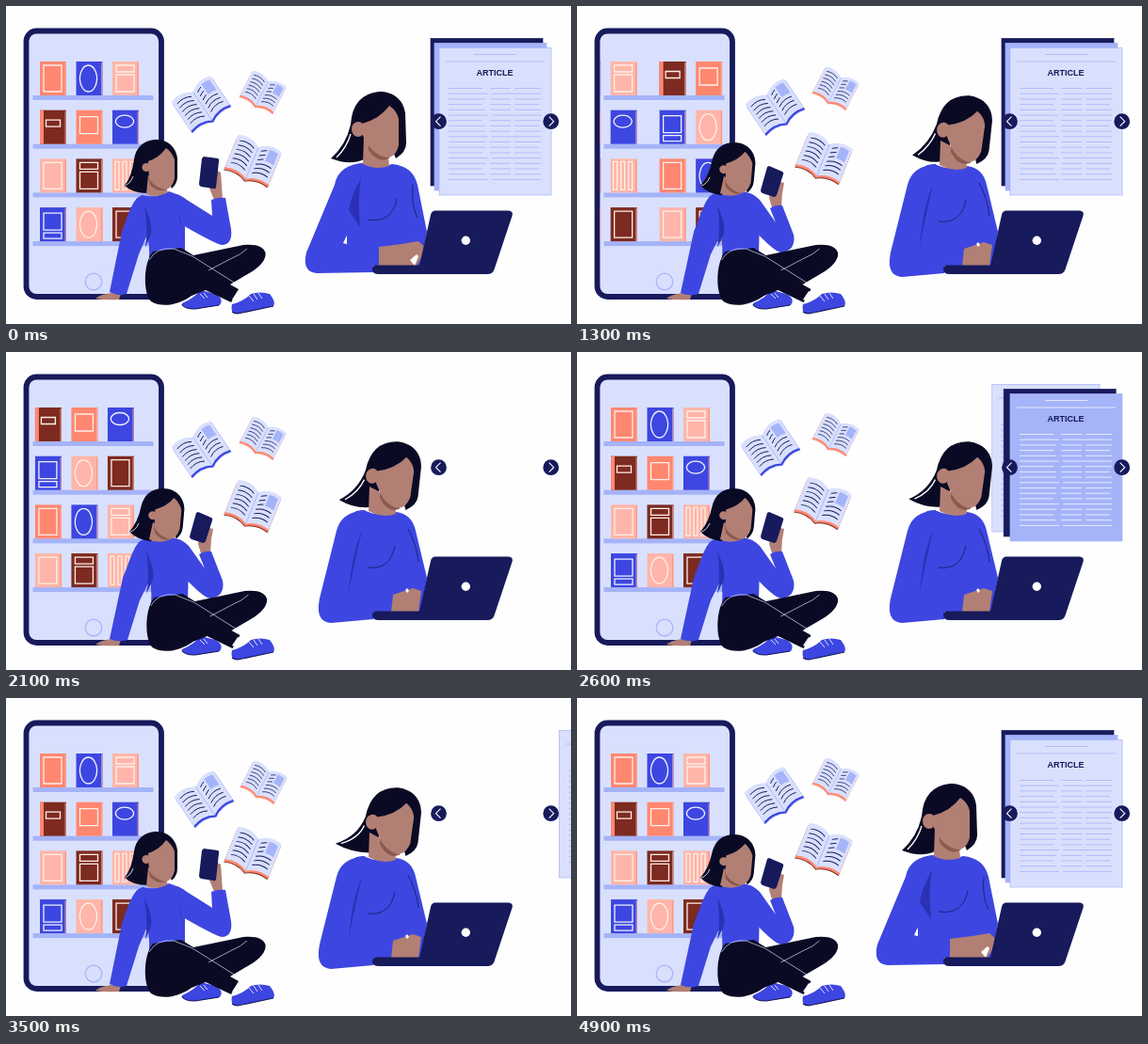
An HTML page that plays this animation: 600x338 px, repeating every 5000 ms.

```html
<!DOCTYPE html>
<html lang="en">
<head>
<meta charset="utf-8">
<title>Reading online</title>
<style>
  html, body { margin: 0; width: 100%; height: 100%; overflow: hidden; background: #fefefe; }
  svg { display: block; width: 100vw; height: 100vh; }
  text { font: bold 9px "Liberation Sans", Arial, sans-serif; text-anchor: middle; fill: #171a5b; }
</style>
</head>
<body>
<svg id="stage" viewBox="0 0 600 338">
  <defs>
    <clipPath id="screen"><rect x="24.5" y="29" width="132.5" height="277"/></clipPath>
  </defs>

  <!-- phone -->
  <rect x="21.5" y="26.500" width="143.500" height="282.500" rx="11" fill="#d9e0fd" stroke="#171a5b" stroke-width="5.800"/>
  <g id="shelves" clip-path="url(#screen)"></g>
  <circle cx="93" cy="293" r="8.800" fill="none" stroke="#a5b3f8" stroke-width="1.200"/>

  <g id="pages"></g>
  <g id="flyers"></g>

  <!-- reader on the floor -->
  <g id="girl">
    <path d="M95,311 Q99,307 111,305 L122,306 L120,312 Q106,313 95,311Z" fill="#b27f74"/>
    <path id="gArm" fill="#3d46e0"/>
    <path id="gBody" fill="#3d46e0"/>
    <path id="gShade" fill="#2a31b4"/>
    <path id="gCrease" fill="none" stroke="#171a5b" stroke-width=".8"/>
    <path id="gHand" fill="#b27f74"/>
    <path id="gPhone" fill="#171a5b"/>
    <path id="gSleeve" fill="#3d46e0"/>
    <g id="gHead">
      <path d="M158,142 C171,141 181,150 182,162 L182,181 Q182,189 176,194 L170,180 L152,180 L150,199 Q135,199 126,191 Q134,180 136,163 Q139,144 158,142Z" fill="#0a0a24"/>
    </g>
    <path id="gNeck" fill="#b27f74"/>
    <g id="gFace">
      <path d="M151,182 L168,190 L172,194 Q163,200 153,190Z" fill="#8b594e"/>
      <circle cx="149" cy="171.500" r="4.500" fill="#b27f74"/>
      <path d="M151,165 Q163,161 170,151 Q176,155 179,163 V183 Q177,194 169,195 Q158,193 152,184Z" fill="#b27f74"/>
      <path d="M135,181 Q133,188 127,191" fill="none" stroke="#fefefe" stroke-width=".8"/>
    </g>
    <path d="M187,316 Q187,322 201,322 L227,318 Q232,311 222,306 L207,302 Q199,311 187,316Z" fill="#3d46e0"/>
    <path d="M187,317 Q188,322 201,322 L226,318" fill="none" stroke="#171a5b" stroke-width="1.200"/>
    <path d="M206,306 l5,5 M210,305 l4,5" stroke="#d9e0fd"/>
    <g id="gLegs">
      <path d="M156,261 C146,272 145,305 154,314 C166,321 183,318 197,308 L212,302 L239,315 L247,301 L238,296 L260,283 Q277,272 275.500,262 Q272,252 252,254 L199,265 L186,257Z" fill="#0a0a24"/>
      <path d="M152,270 Q160,256 178,258 L198,266 L244,295 M256,258 Q250,264 238,269 L215,281" fill="none" stroke="#d9e0fd" stroke-width=".7"/>
    </g>
    <path d="M240,312 L246,303 L253,308 L248,315Z" fill="#fefefe"/>
    <path d="M240,317 Q252,314 260,306 Q270,303 280,306 Q287,315 284,319 L245,327 Q238,327 240,317Z" fill="#3d46e0"/>
    <path d="M240,325 Q244,328 251,326 L284,319" fill="none" stroke="#171a5b" stroke-width="1.200"/>
    <path d="M258,308 l5,6 M263,306 l4,6 M268,305 l4,6" stroke="#d9e0fd"/>
  </g>

  <!-- reader at the laptop -->
  <g id="woman">
    <path id="wBody" fill="#3d46e0"/>
    <path id="wArm" fill="#3d46e0"/>
    <path id="wShade" fill="#2a31b4"/>
    <path id="wCrease" fill="none" stroke="#171a5b" stroke-width=".8"/>
    <path id="wHand" fill="#b27f74"/>
    <path id="wGap" fill="#fefefe"/>
    <g id="wHead">
      <path id="wHair" fill="#0a0a24"/>
      <path id="wStrand" fill="none" stroke="#fefefe" stroke-width="1.300"/>
    </g>
    <path id="wNeck" fill="#b27f74"/>
    <g id="wFace">
      <path d="M385,145 L405,156 L408,161 Q396,169 385,153Z" fill="#8b594e"/>
      <ellipse cx="374" cy="131" rx="7" ry="8" fill="#b27f74"/>
      <path d="M378,125 Q397,120 407,106 Q415,111 417,120 V148 Q414,161 404,161 Q391,158 385,148 L379,138Z" fill="#b27f74"/>
    </g>
    <path d="M393,275.500 H512 V285 H396 Q389,285 389,280 Q389,275.500 393,275.500Z" fill="#171a5b"/>
    <path d="M456,217.500 H533 Q539,217.500 537.500,223 L518.500,280 Q517,285 511,285 H437 L451,222 Q452,217.500 456,217.500Z" fill="#171a5b"/>
    <circle cx="488.300" cy="249.300" r="4.700" fill="#fefefe"/>
  </g>
  <g id="arrows"></g>
</svg>

<script>
const LOOP = 5000, STEP = 100;
const navy = '#171a5b', blue = '#3d46e0', sky = '#a5b3f8', pale = '#d9e0fd',
      orange = '#ff8770', pink = '#ffb5a9', brown = '#7d2a20';

const $ = id => document.getElementById(id);
const clamp = p => Math.max(0, Math.min(1, p));
const span = (t, from, to) => clamp((t - from) / (to - from));
const smooth = p => p * p * (3 - 2 * p);
const inOut = p => p < .5 ? 4 * p ** 3 : 1 - (2 - 2 * p) ** 3 / 2;

function add(parent, tag, attrs) {
  const el = document.createElementNS('http://www.w3.org/2000/svg', tag);
  for (const k in attrs) el.setAttribute(k, attrs[k]);
  return parent.appendChild(el);
}

// Blend two paths that share the same commands.
function blend(a, b, k) {
  const num = /-?\d+(\.\d+)?/g, to = b.match(num);
  let i = 0;
  return a.replace(num, v => (+v + (to[i++] - v) * k).toFixed(2));
}

// ---- shelves ----
const covers = {
  frame: 'M4,4H23V32H4Z',
  tall: 'M13,4a9,14 0 1 0 .01,0Z',
  wide: 'M13,5.500a9.500,6.500 0 1 0 .01,0Z',
  title: 'M4,4H23V11H4Z M4,14H23V32H4Z',
  label: 'M6.500,10.500H21.500V17.500H6.500Z',
  square: 'M4,7H23V25H4Z',
  bars: 'M3,3H7V33H3Z M11,3H15V33H11Z M19,3H23V33H19Z',
  boxes: 'M4,6H23V24H4Z M4,27H23V33H4Z'
};
const groups = [
  [[orange, 'frame'], [blue, 'tall'], [pink, 'title']],
  [[brown, 'label'], [orange, 'square'], [blue, 'wide']],
  [[pink, 'frame'], [brown, 'title'], [pink, 'bars']],
  [[blue, 'boxes'], [pink, 'tall'], [brown, 'frame']]
];
const follow = [1, 3, 0, 2], groupWidth = 129;

const rows = groups.map((_, r) => {
  const y = 95 + r * 51.700;
  add($('shelves'), 'rect', { x: 28.500, y, width: 128, height: 5, fill: sky });
  const row = add($('shelves'), 'g', {});
  [r, follow[r], r].forEach((g, n) => groups[g].forEach(([color, cover], i) => {
    const book = add(row, 'g', { transform: `translate(${36 + n * groupWidth + i * 38.5},${y - 36})` });
    add(book, 'rect', { width: 28, height: 36, fill: color });
    add(book, 'rect', { x: 26.500, y: 1, width: 1.500, height: 35, fill: color === pink ? orange : pink, opacity: .6 });
    if (cover === 'label') add(book, 'rect', { width: 4, height: 36, fill: orange });
    add(book, 'path', { d: covers[cover], fill: 'none', stroke: color === blue ? '#eef1ff' : '#fff0ea', 'stroke-width': 1.3 });
  }));
  return row;
});

// ---- flying books ----
function makeFlyer(cover, edge) {
  const g = add($('flyers'), 'g', {});
  const leaf = 'M0,-15 Q-11,-24 -25,-19 V18 Q-11,14 0,21 Q11,14 25,18 V-19 Q11,-24 0,-15Z';
  add(g, 'path', { d: leaf, fill: edge, transform: 'translate(0,3.5)' });
  add(g, 'path', { d: leaf, fill: cover, transform: 'translate(0,2.5)' });
  add(g, 'path', { d: leaf, fill: pale });
  add(g, 'path', { d: 'M0,-15V21', stroke: sky, 'stroke-width': .8 });
  let d = '';
  for (let i = 0; i < 6; i++) {
    const y = -14 + i * 5;
    d += `M-21,${y} Q-12,${y - 3} -4,${y + 2} `;
    d += i < 3 ? `M4,${y + 2} Q7,${y} 10,${y - 1} ` : `M4,${y + 2} Q12,${y - 3} 21,${y} `;
  }
  add(g, 'path', { d, fill: 'none', stroke: navy, 'stroke-width': .9 });
  add(g, 'path', { d: 'M12,-17 Q17,-18 22,-16 V-3 Q17,-5 12,-4Z', fill: sky });
  return g;
}
const beats = [0, 1300, 2100, 2600, 3500, 4000, 4900];
const flyers = [
  { el: makeFlyer(blue, pale), x: 207, y: 104, turn: -34, size: 1,
    dx: [0, 3, 0, -2, 3, 0, 2], dy: [0, 3, -1, -3, 3, 0, -1] },
  { el: makeFlyer(orange, pink), x: 273, y: 91, turn: 27, size: .8,
    dx: [0, 2, 0, 2, 1, 0, 2], dy: [0, -4, 0, -4, -2, 0, -5] },
  { el: makeFlyer(orange, brown), x: 262.500, y: 164, turn: 22, size: 1,
    dx: [0, 0, 0, -1, 0, 0, 0], dy: [0, -3, -1, -4, 0, 0, -4] }
];
function along(t, vals) {
  let i = 0;
  while (i < beats.length - 2 && t >= beats[i + 1]) i++;
  return vals[i] + (vals[i + 1] - vals[i]) * smooth(span(t, beats[i], beats[i + 1]));
}

// ---- article pages ----
function makePage(color, ink) {
  const g = add($('pages'), 'g', {});
  add(g, 'rect', { width: 119, height: 156.500, fill: color, stroke: color === pale ? sky : color, 'stroke-width': .7 });
  let d = 'M37,7H82 M7,14.500H112 ';
  for (let i = 0; i < 18; i++) {
    const y = (43 + i * 5.700).toFixed(1);
    d += i % 4 === 1 ? `M10,${y}H52 M56,${y}H108 ` : `M10,${y}H${i % 3 ? 49 : 46} M54,${y}H76 M80,${y}H${i % 2 ? 106 : 108} `;
  }
  add(g, 'path', { d, stroke: ink, 'stroke-width': .8 });
  add(g, 'text', { x: 59, y: 29.500 }).textContent = 'ARTICLE';
  return g;
}
const sheets = { navy: makePage(navy, pale), sky: makePage(sky, '#f6f8ff'), pale: makePage(pale, sky) };
const slots = [[460, 44.500], [455, 39.500], [451, 34.500]];
const stacks = [
  { order: ['pale', 'sky', 'navy'], enter: -2000, leave: 1460 },
  { order: ['sky', 'navy', 'pale'], enter: 2172, leave: 2900 },
  { order: ['pale', 'sky', 'navy'], enter: 3613, leave: 9000 }
];
let shown = null;

function drawPages(t) {
  const stack = stacks[t < 2130 ? 0 : t < 3580 ? 1 : 2];
  if (shown !== stack) {
    shown = stack;
    [...stack.order].reverse().forEach(n => $('pages').append(sheets[n]));
  }
  stack.order.forEach((name, i) => {
    const p = clamp((t - stack.enter - i * 79) / 450);
    const out = Math.max(0, t - stack.leave - i * 95) / 1000;
    const x = slots[i][0] - 160 * (1 - p) ** 3 + 812 * out * out;
    const sx = Math.min(1, .6 + .6 * p);
    sheets[name].setAttribute('transform', `translate(${x},${slots[i][1]}) scale(${sx},1)`);
    sheets[name].setAttribute('opacity', Math.min(1, p * 4));
  });
}

for (const [x, dir] of [[459.500, -1], [578.700, 1]]) {
  const g = add($('arrows'), 'g', { transform: `translate(${x},122.700) scale(${dir},1)` });
  add(g, 'circle', { r: 8.400, fill: navy });
  add(g, 'path', { d: 'M-2,-5 L3,0 L-2,5', fill: 'none', stroke: '#fefefe', 'stroke-width': 1.1 });
}

// ---- people: each part has two poses ----
const girl = {
  gArm: ['M146,201 C134,203 130,222 123,240 L110,304 Q119,309 128,306 L141,264 L153,236Z',
         'M147,199 C136,201 132,222 124,240 L110,305 Q119,309 129,306 L142,264 L156,236Z'],
  gBody: ['M145,201 Q160,205 173,197 L184,201 Q190,206 190,225 L190,266 L152,268 Q153,240 143,225 L138,205Z',
          'M147,199 Q163,204 177,197 L186,200 Q193,205 194,225 L193,266 L154,268 Q156,240 146,225 L140,203Z'],
  gShade: ['M147,213 Q156,230 154,242 L148,257 Q151,238 147,213Z', 'M149,212 Q158,230 156,242 L149,257 Q153,238 149,212Z'],
  gCrease: ['M184,216 L186,232', 'M187,216 L189,236'],
  gHand: ['M221,206 L215,191 L214,179 L221,173 L228,177 L229,190 L230,206Z',
          'M207,214 L204,204 L206,193 L212,186 L220,188 L218,199 L217,214Z'],
  gPhone: ['M210,160 L225,162 Q227,163 226,165 L223,193 Q222,195 220,194 L207,192 Q205,191 205,189 L208,162Z',
           'M204,170 L218,176 Q220,177 219,179 L212,201 Q211,203 209,203 L197,199 Q195,198 195,196 L202,171Z'],
  gSleeve: ['M180,200 Q186,201 192,206 L219,223 L218,206 Q226,203 233,204 L239,237 Q241,253 230,254 Q224,254 186,232Z',
            'M182,199 Q188,200 194,206 L211,230 L205,215 Q211,211 218,212 L230,243 Q233,259 218,262 Q211,263 188,238Z'],
  gNeck: ['M151,180 L169,191 L172,198 Q159,205 149,200Z', 'M156,181 L175,193 L177,198 Q163,205 152,199Z']
};
const woman = {
  wNeck: ['M380,138 L405,150 L407,170 Q393,175 379,168Z', 'M386,143 L413,157 L414,172 Q400,177 385,169Z'],
  wBody: ['M380,167 Q396,174 410,168 Q432,170 437,190 L447,240 L440,276 L362,276 L362,215 Q356,180 372,168Z',
          'M380,168 Q396,176 414,170 Q431,172 435,190 L447,240 L440,276 L350,276 L350,215 Q352,185 372,169Z'],
  wArm: ['M381,167 Q353,168 349,190 L319,262 Q314,283 330,284 L390,283 L390,262 L358,252 L376,215Z',
         'M381,168 Q356,170 351,190 L333,262 Q328,287 345,288 L390,284 L390,262 L372,252 L378,215Z'],
  wShade: ['M377,183 Q366,203 364,217 L376,235 Q373,205 377,183Z', 'M378,190 Q367,215 364,257 L366,245 Q372,215 378,190Z'],
  wCrease: ['M384,227 Q410,231 415,205 M432,190 Q430,212 437,225', 'M384,229 Q408,232 413,206 M427,188 Q436,205 438,223'],
  wHand: ['M396,256 L420,253 L438,250 L447,258 L436,276 L396,276Z', 'M411,258 L426,253 L432,251 L441,254 L438,277 L409,277Z'],
  wGap: ['M429,270 L436,264 L438,266 L434,276Z', 'M424,253 L426,251 L428,254 L426,256Z']
};
function pose(parts, k) {
  for (const id in parts) $(id).setAttribute('d', blend(...parts[id], k));
}
function place(ids, transform) {
  for (const id of ids) $(id).setAttribute('transform', transform);
}

function drawPeople(t) {
  const g = smooth(span(t, 400, 1050)) - smooth(span(t, 2800, 3350)) + smooth(span(t, 4250, 4850));
  pose(girl, g);
  place(['gHead', 'gFace'], `translate(${7 * g},${3 * g}) rotate(${5 * g},158,168)`);
  place(['gLegs'], `translate(${1.5 * g},0)`);

  const w = smooth(span(t, 300, 1000)) - smooth(span(t, 4150, 4800));
  pose(woman, w);
  place(['wHead', 'wFace'], `translate(${15 * w},${4 * w}) rotate(${8 * w},397,130)`);
  const sway = 7 * w * span(t, 1300, 3600), tx = 345 - sway, ty = 162 - sway * .4;
  $('wHair').setAttribute('d', `M396,91 C411,91 422,99 424,114 L425,146 Q425,155 414,162 L405,140 L384,140
    L380,163 Q${tx + 20},${ty + 8} ${tx},${ty} Q361,148 366,126 Q368,94 396,91Z`);
  $('wStrand').setAttribute('d', `M366,136 Q362,150 ${tx + 6},${ty - 1}`);
}

function draw(t) {
  const shift = -groupWidth * (inOut(span(t, 1000, 1560)) + inOut(span(t, 1980, 2540)));
  rows.forEach(r => r.setAttribute('transform', `translate(${shift},0)`));
  flyers.forEach(f => f.el.setAttribute('transform',
    `translate(${f.x + along(t, f.dx)},${f.y + along(t, f.dy)}) rotate(${f.turn}) scale(${f.size})`));
  drawPages(t);
  drawPeople(t);
}

const start = performance.now();
function tick() {
  const t = performance.now() - start + 15;
  draw(Math.floor(t % LOOP / STEP) * STEP);
  requestAnimationFrame(tick);
}
tick();
</script>
</body>
</html>
```
